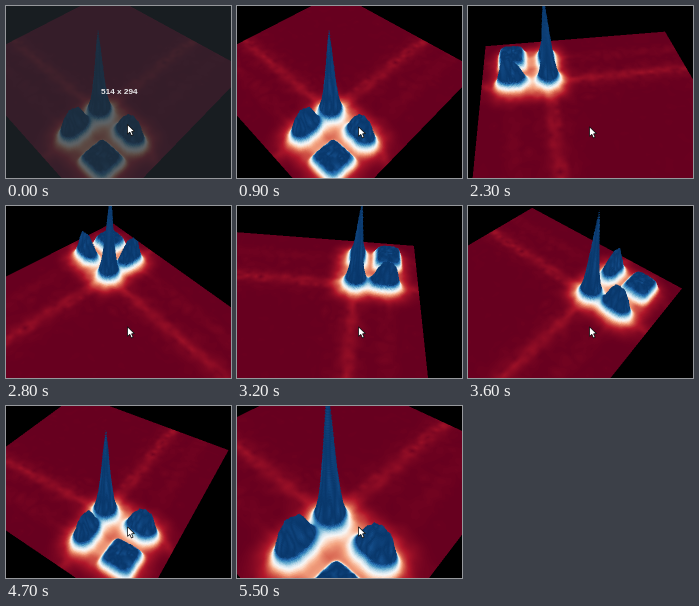
Write a matplotlib script that moves like this. It is 225 px wide and 172 px high and loops after 5.6 s.

```python
import numpy as np
import matplotlib
import matplotlib.pyplot as plt
from matplotlib.animation import FuncAnimation
from matplotlib.patches import Polygon, Rectangle

W, H, DPI = 225, 172, 100
STEP, FRAMES = 100, 56
N = 600                      # height map resolution
SS = 2                       # supersampling

# camera: screen centre, focal length, elevation, orbit pivot on the plane
CX, CY, FOCAL = 97.5, 88, 266
SIN, COS = np.sin(np.radians(50.5)), np.cos(np.radians(50.5))
PIVOT = 0.233
FAR = 2.43

TURN_T = [0, 1100, 1600, 2300, 2800, 3400, 3500, 3600,
          4100, 4200, 4400, 4500, 4800, 5600]
TURN = [269, 269, 221.5, 142.2, 84.5, 15, 15, 3.5,
        -36, -36, -58, -58, -89, -89]
ZOOM_T = [0, 5300, 5400, 5500]
ZOOM = [FAR, FAR, 2.1, 1.79]

rng = np.random.default_rng(4)
axis = np.linspace(-1, 1, N)
A, B = np.meshgrid(axis, axis, indexing="ij")


def noise(cells):
    """Smooth random field, bilinear between cells."""
    x = np.linspace(0, cells - 1, N)[:, None]
    w = np.maximum(0, 1 - abs(x - np.arange(cells)))
    return w @ rng.standard_normal((cells, cells)) @ w.T


def bump(x, at, half, power=2.0):
    return np.exp(-(abs(x - at) / half) ** power)


def build_surface():
    spike = 0.9 * np.exp(-(np.hypot(A - 0.37, B - 0.41) / 0.053) ** 1.35)
    z = (spike
         + 0.31 * bump(A, 0.71, 0.12, 3) * bump(B, 0.41, 0.068)
         + 0.32 * bump(A, 0.37, 0.068) * bump(B, 0.68, 0.12, 3)
         + 0.15 * bump(A, 0.71, 0.13, 6) * bump(B, 0.71, 0.13, 6))
    z *= 1 + 0.04 * noise(110)
    glow = 0.22 * bump(A, 0.55, 0.33, 5) * bump(B, 0.55, 0.33, 5)
    ridge = sum(0.036 * bump(x, at, 0.06) + 0.012 * bump(x, at, 0.17)
                + 0.012 * bump(x, 0.71, 0.08) for x, at in ((A, 0.37), (B, 0.41)))
    value = z / 0.16 + glow * (1 + 0.12 * noise(40))
    value += ridge * (1 + 0.3 * noise(45)) + 0.004 * abs(noise(30))
    value = np.minimum(value, 0.985 - 0.02 * abs(noise(90)))
    return z.astype(np.float32), np.clip(value, 0, 1).astype(np.float32)


HEIGHT, VALUE = build_surface()
LEVELS = 0.94 * np.linspace(1, 0, 88) ** 1.2
RAMP = matplotlib.colormaps["RdBu"]

gx, gy = np.meshgrid((np.arange(W * SS) + 0.5) / SS, (np.arange(H * SS) + 0.5) / SS)
RAY_X = ((gx - CX) / FOCAL).ravel()
RAY_Y = ((CY - gy) / FOCAL).ravel()


def plane_point(z, turn, dist):
    """Where every pixel's ray crosses height z, in surface coordinates."""
    v = (RAY_Y * (dist - z * SIN) - z * COS) / (SIN - RAY_Y * COS)
    u = RAY_X * (dist + v * COS - z * SIN)
    c, s = np.cos(turn), np.sin(turn)
    along, side = u * c + v * s, v * c - u * s
    return PIVOT + (along + side) / 2 ** 0.5, PIVOT + (along - side) / 2 ** 0.5


def cell(x):
    return np.clip((x + 1) * (0.5 * (N - 1)) + 0.5, 0, N - 1).astype(np.int32)


def render(turn, dist):
    a0, b0 = plane_point(0, turn, dist)
    a1, b1 = plane_point(1, turn, dist)
    da, db = a1 - a0, b1 - b0

    def near(p, q):
        return (np.minimum(p, q) < 1) & (np.maximum(p, q) > 0.15)

    todo = np.flatnonzero(near(a0, a1) & near(b0, b1))
    pa, pb, qa, qb = a0[todo], b0[todo], da[todo], db[todo]
    hit = np.zeros(a0.size)
    for z in LEVELS:
        free = HEIGHT[cell(pa + z * qa), cell(pb + z * qb)] < z
        hit[todo[~free]] = z
        todo, pa, pb, qa, qb = (k[free] for k in (todo, pa, pb, qa, qb))

    a, b = a0 + hit * da, b0 + hit * db
    rgb = RAMP(VALUE[cell(a), cell(b)])[:, :3]
    rgb[(abs(a) > 1) | (abs(b) > 1)] = 0
    return rgb.reshape(H, SS, W, SS, 3).mean(axis=(1, 3))


views = {}


def view(t):
    key = (np.interp(t, TURN_T, TURN), np.interp(t, ZOOM_T, ZOOM))
    if key not in views:
        views[key] = render(np.radians(key[0]), key[1])
    return views[key]


fig = plt.figure(figsize=(W / DPI, H / DPI), dpi=DPI, facecolor="black")
ax = fig.add_axes([0, 0, 1, 1])
ax.axis("off")
picture = ax.imshow(np.zeros((H, W, 3)), extent=(0, W, H, 0),
                    interpolation="nearest", aspect="auto")
ax.set_xlim(0, W)
ax.set_ylim(H, 0)

veil = ax.add_patch(Rectangle((0, 0), W, H, fc=(0.135, 0.16, 0.18), ec="none", alpha=0.72))
label = ax.text(113, 86.5, "514 x 294", color="#e8e8ea", ha="center", va="center",
                family="Liberation Sans", weight="bold", size=8.3 * 72 / DPI)

ARROW = np.array([(0, 0), (0, 9.6), (2.3, 7.6), (3.9, 11.2),
                  (5.6, 10.4), (4.1, 7), (7, 6.8)])
pointer = ax.add_patch(Polygon(ARROW, fc="white", ec="black", lw=0.5, zorder=5))


def pointer_y(t):
    if t < 700:
        return 118.5
    return 138 if t < 900 else 120.8


def draw(i):
    t = i * STEP
    picture.set_data(view(t))
    veil.set_visible(i == 0)
    label.set_visible(i == 0)
    pointer.set_xy(ARROW + (121.5, pointer_y(t)))
    return picture, veil, label, pointer


anim = FuncAnimation(fig, draw, frames=FRAMES, interval=STEP,
                     repeat=True, repeat_delay=0, blit=False)
plt.show()
```
